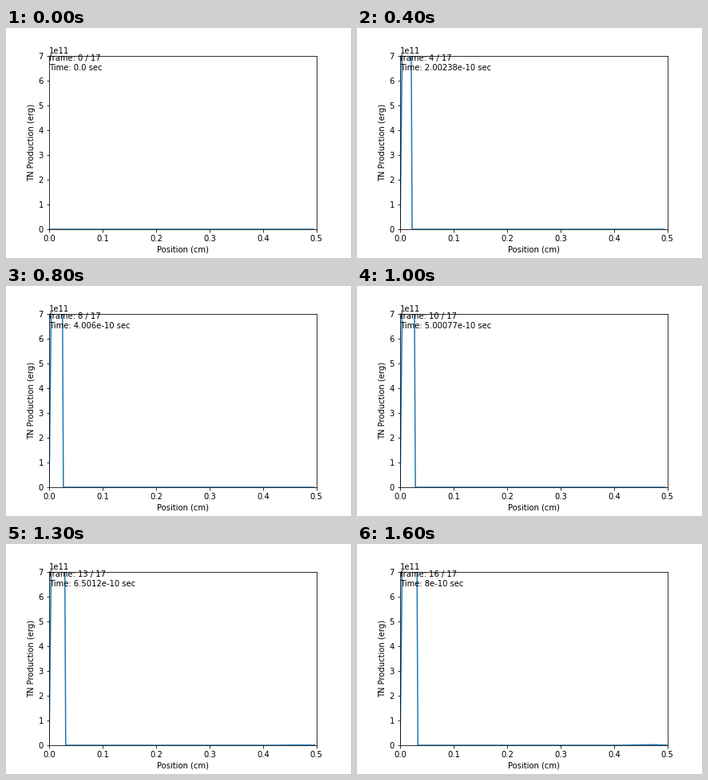
A matplotlib script that plays this animation: 432 by 288 pixels, repeating every 1.7 s.

```python
import numpy as np
import matplotlib.pyplot as plt
from matplotlib.animation import FuncAnimation

COUNT = 17
INTERVAL = 100
Y_MAX = 7e11
TIMES = [0.0, 5.02155e-11, 1.01214e-10, 1.50118e-10, 2.00238e-10, 2.50317e-10,
         3.00124e-10, 3.50204e-10, 4.006e-10, 4.50152e-10, 5.00077e-10,
         5.50211e-10, 6.00085e-10, 6.5012e-10, 7.00163e-10, 7.50094e-10, 8e-10]

plt.rcParams.update({"font.family": "DejaVu Sans", "font.size": 10})
fig = plt.figure(figsize=(6, 4), dpi=72, facecolor="white")
fig.subplots_adjust(left=0.125, right=0.9, bottom=0.125, top=0.88)
ax = fig.add_subplot()
ax.set(xlim=(0, 0.5), ylim=(0, Y_MAX),
       xlabel="Position (cm)", ylabel="TN Production (erg)")

line, = ax.plot([], [], color="#1f77b4", lw=1.5)
frame_text = ax.text(0, 1 - 6.5 / 217.44, "", transform=ax.transAxes)
time_text = ax.text(0, 1 - 18.5 / 217.44, "", transform=ax.transAxes)
CM_PER_PX = 0.5 / 334.8


def profile(k):
    """Burn region near the origin, then a nearly empty outer region."""
    end = 0.494 + 0.0045 * (k / 16) ** 2
    if k == 0:
        return [0, end], [0, 0]
    step = k - 2
    foot = (13.5 + 0.8 * step - 0.0125 * step ** 2) * CM_PER_PX
    slant = (4.5 if k <= 2 else 1.1) * CM_PER_PX
    rise = 2.5 * CM_PER_PX
    tail_x = np.linspace(foot, end, 60)
    growth = max(0, (k - 10) / 6)
    tail_y = 2e9 * growth * np.exp(-((tail_x - 0.468) / 0.035) ** 2)
    x = np.concatenate([[0, 1.5 * rise, foot - 1.5 * slant, foot], tail_x])
    y = np.concatenate([[0, 1.5 * Y_MAX, 1.5 * Y_MAX, 0], tail_y])
    return x, y


def update(k):
    line.set_data(*profile(k))
    frame_text.set_text(f"frame: {k} / {COUNT}")
    time_text.set_text(f"Time: {TIMES[k]} sec")
    return line, frame_text, time_text


anim = FuncAnimation(fig, update, frames=COUNT, interval=INTERVAL,
                     repeat=True, repeat_delay=0, blit=False)
plt.show()
```
